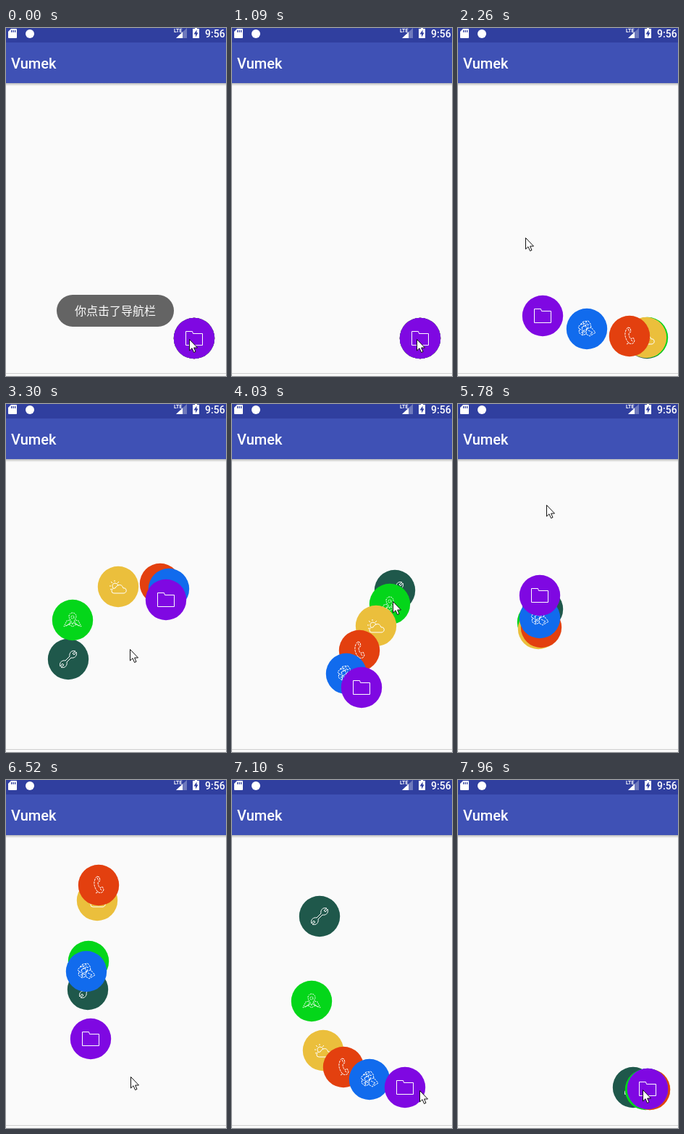
An HTML page with a canvas for the animation above (8000 ms loop, 304 by 480 pixels).

```html
<!DOCTYPE html>
<html lang="zh">
<head>
<meta charset="utf-8">
<title>Floating menu</title>
<style>
html, body { margin: 0; width: 100%; height: 100%; overflow: hidden; background: #fafafa; }
canvas { display: block; width: 304px; height: 480px; }
</style>
</head>
<body>
<canvas id="stage"></canvas>
<script>
const W = 304, H = 480, LOOP = 8000;
const LAG = 172;                 // delay between neighbours in the chain, ms
const LEAD = 370;                // how far the pointer runs ahead of the chain, ms
const FIRST = 200, STEP = 146.4; // the screen refreshes in even steps after a pause
const canvas = document.getElementById('stage');
const ctx = canvas.getContext('2d');
const dpr = window.devicePixelRatio || 1;
canvas.width = W * dpr;
canvas.height = H * dpr;

// Turning points of the drag that pointer and buttons all follow: [ms, x, y]
const route = [
  [1200, 260, 428], [1744, 260, 427], [1916, 239, 425], [2260, 119, 398],
  [2440, 85, 349], [2612, 94, 295], [2784, 158, 251], [2956, 214, 248],
  [3300, 220, 271], [3900, 156, 380], [4072, 193, 388], [4244, 239, 338],
  [4416, 224, 263], [4588, 164, 244], [4760, 130, 263], [5092, 110, 301],
  [5436, 115, 308], [5780, 113, 264], [6120, 130, 134], [6348, 111, 269],
  [6520, 118, 359], [6890, 181, 409], [7100, 240, 424], [7444, 265, 427],
  [7800, 262, 426]
];

// Bottom of the stack first
const buttons = [
  { color: '#1f584b', icon: 'M-4 2L2 -4C1 -8 4 -13 10 -11L6 -8L8 -6L11 -10C13 -4 8 -1 4 -2L-2 4C-1 8 -4 13 -10 11L-6 8L-8 6L-11 10C-13 4 -8 1 -4 2Z' },
  { color: '#04d61a', icon: 'M0 6L-4 -2A5 5 0 1 1 4 -2ZM2 -4A2 2 0 1 1 -2 -4A2 2 0 1 1 2 -4M-4 0L-8 1L-12 9L-5 6L0 9L5 6L12 9L8 1L4 0M-5 6L-3 2M5 6L3 2M-9 8L-2 4M9 8L2 4', dash: [2, 1] },
  { color: '#ebbf3c', icon: 'M-6 9H8Q12 8 11 4Q10 1 7 2Q5 -4 0 -2Q-3 -1 -4 2Q-9 2 -9 6Q-9 9 -6 9M-7 2Q-10 -3 -5 -5Q-1 -5 0 -2M-5 -9V-7M-10 -7L-8 -5M-12 -1H-10M-11 4L-9 3M1 -7L-1 -5' },
  { color: '#e3400f', icon: 'M-2 -12L1 -11L2 -6L-1 -4Q-1 1 2 4L5 2L7 6L6 9Q1 13 -3 7Q-8 -1 -5 -8Q-4 -11 -2 -12M-2 -10L0 -6M2 5L5 8M-4 11L0 9', dash: [3, 1] },
  { color: '#116bed', icon: 'M-9 -6L-5 -10L2 -11L5 -7L6 -2L12 5L4 10L-1 7L-6 9L-11 5L-10 0L-12 -2ZM-9 -6L-3 -7L0 -10M-7 -2L-2 -5L4 -6M-10 0L-5 3L-6 9M-2 -5L0 0L-5 3M0 0L6 -2M0 0L-1 7M2 2L8 5L4 8M-7 -2L-5 3M-8 5L-2 4L2 -3M-5 -9L-4 -3L1 -8', dash: [3, 1] },
  { color: '#7f08e2', icon: 'M-11.5 -9.5H-2.5L-1.5 -6.5H11.5V9.5H-11.5Z' }
].map(b => ({ ...b, path: new Path2D(b.icon) }));

const arrow = new Path2D('M.5 .5V16L4 12.7L6.6 18.5L9 17.4L6.6 12H11.5Z');

// Smooth curve through the turning points
function along(t) {
  const last = route.length - 1;
  if (t <= route[0][0]) return route[0].slice(1);
  if (t >= route[last][0]) return route[last].slice(1);
  const i = route.findIndex(key => key[0] > t) - 1;
  const a = route[i], b = route[i + 1];
  const before = route[Math.max(0, i - 1)], after = route[Math.min(last, i + 2)];
  const span = b[0] - a[0], u = (t - a[0]) / span;
  return [1, 2].map(k => {
    const m = (b[k] - before[k]) / (b[0] - before[0]) * span;
    const n = (after[k] - a[k]) / (after[0] - a[0]) * span;
    const d = b[k] - a[k];
    return a[k] + u * (m + u * (3 * d - 2 * m - n + u * (m + n - 2 * d)));
  });
}

function stepped(t) {
  if (t < FIRST) return 0;
  return FIRST + 16 + Math.floor((t - FIRST) / STEP) * STEP;
}

function rect(color, x, y, w, h) {
  ctx.fillStyle = color;
  ctx.fillRect(x, y, w, h);
}

function disc(color, x, y, r) {
  ctx.fillStyle = color;
  ctx.beginPath();
  ctx.arc(x, y, r, 0, Math.PI * 2);
  ctx.fill();
}

function shape(color, d) {
  ctx.fillStyle = color;
  ctx.fill(new Path2D(d));
}

function text(str, x, y, font) {
  ctx.font = font;
  ctx.fillStyle = '#fff';
  ctx.fillText(str, x, y);
}

function drawScreen() {
  rect('#fafafa', 0, 0, W, H);
  rect('#303f9f', 0, 0, W, 20);
  rect('#3f51b5', 0, 20, W, 56);
  const shadow = ctx.createLinearGradient(0, 76, 0, 80);
  shadow.addColorStop(0, 'rgba(0,0,0,.26)');
  shadow.addColorStop(1, 'rgba(0,0,0,0)');
  rect(shadow, 0, 76, W, 4);
  rect('#d0d0d0', 0, 476, W, 1);
  text('Vumek', 7, 56, '500 20px Roboto, sans-serif');
  text('9:56', 275, 13, '500 14px Roboto, sans-serif');

  // status icons
  shape('#fff', 'M7 1H14Q15 1 15 2V13Q15 14 14 14H4Q3 14 3 13V5Z');
  for (const x of [7, 9.5, 12]) rect('#303f9f', x, 3, 1.3, 3);
  disc('#fff', 33, 8, 6);
  shape('rgba(255,255,255,.3)', 'M250 0V14H235Z');
  shape('#fff', 'M244 5.6V14H235Z');
  text('LTE', 232, 6, '700 7px Roboto, sans-serif');
  shape('#fff', 'M258 1H261V0H264V1H267V14H258Z');
  shape('#303f9f', 'M263.5 2.5L259.5 8.5H262V12.5L265.5 6.5H263.5Z');
}

function drawButton({ color, path, dash }, x, y) {
  disc(color, x, y, 28.2);
  ctx.save();
  ctx.translate(x, y);
  ctx.strokeStyle = '#fff';
  ctx.lineWidth = 1;
  ctx.setLineDash(dash || []);
  ctx.stroke(path);
  ctx.restore();
}

function drawToast(alpha) {
  if (alpha <= 0) return;
  ctx.save();
  ctx.globalAlpha = alpha;
  ctx.fillStyle = '#646464';
  ctx.beginPath();
  ctx.roundRect(70, 368, 162, 44, 22);
  ctx.fill();
  text('你点击了导航栏', 95, 396, '16px "Noto Sans CJK SC", "Noto Sans CJK", sans-serif');
  ctx.restore();
}

function drawPointer(x, y) {
  ctx.save();
  ctx.translate(x, y);
  ctx.fillStyle = '#fff';
  ctx.fill(arrow);
  ctx.strokeStyle = '#111';
  ctx.lineWidth = 1;
  ctx.stroke(arrow);
  ctx.restore();
}

function draw(t) {
  ctx.setTransform(dpr, 0, 0, dpr, 0, 0);
  drawScreen();
  buttons.forEach((b, i) => {
    const [x, y] = along(t - (buttons.length - 1 - i) * LAG);
    drawButton(b, Math.round(x), Math.round(y));
  });
  drawToast(1 - t / 600);
  const [x, y] = along(t + LEAD);
  drawPointer(Math.round(x) - 7, Math.round(y) + 1);
}

const start = performance.now();
function tick() {
  draw(stepped((performance.now() - start) % LOOP));
  requestAnimationFrame(tick);
}
tick();
</script>
</body>
</html>
```
